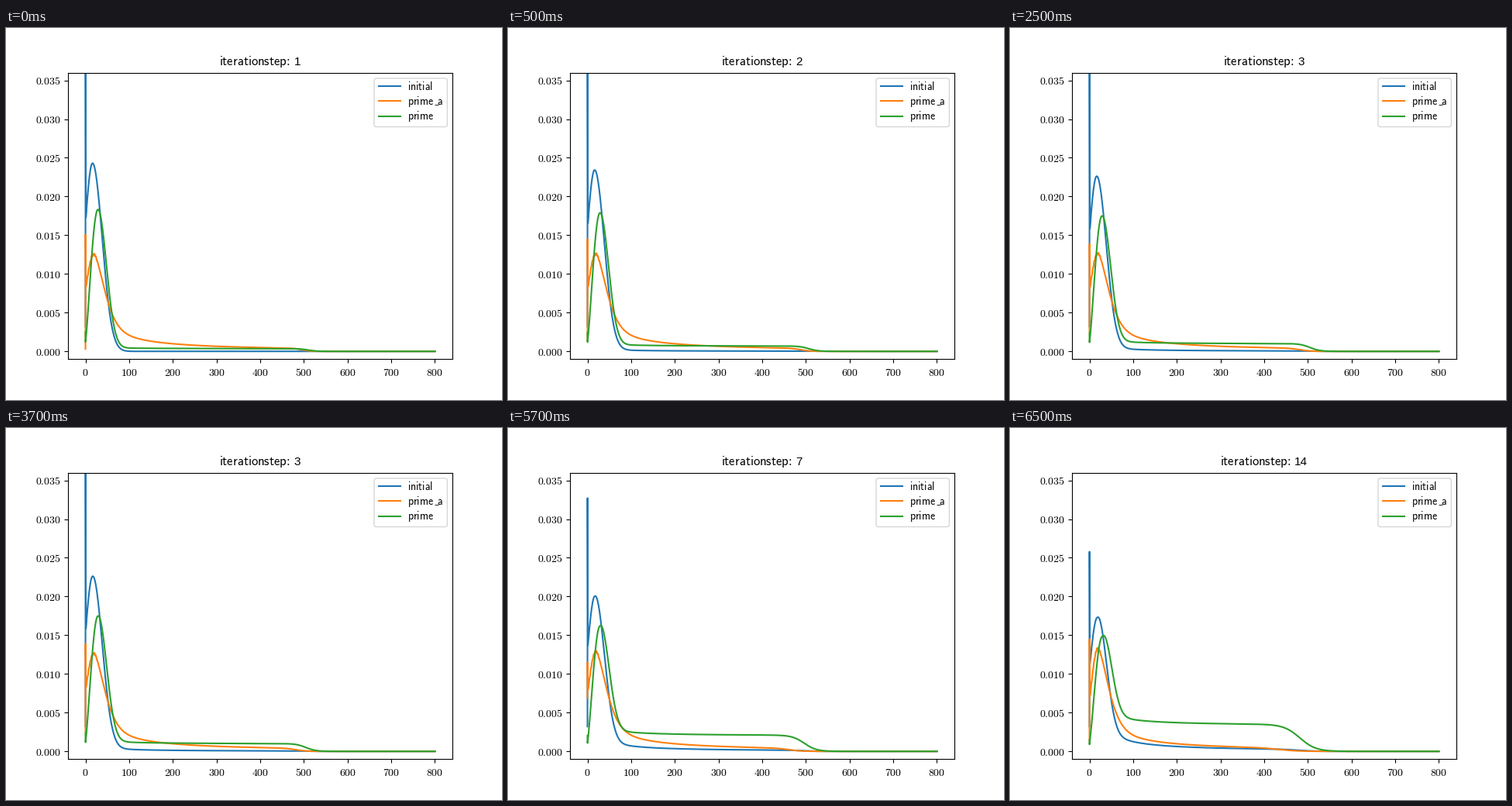
A matplotlib script for the animation above (8000 ms loop, 640 by 480 pixels).

```python
import numpy as np
import matplotlib.pyplot as plt
from matplotlib.animation import FuncAnimation
from matplotlib.patches import FancyBboxPatch

plt.rcParams["mathtext.fontset"] = "cm"

COLORS = {"initial": "#1f77b4", "prime_a": "#ff7f0e", "prime": "#2ca02c"}
STEPS = [1, 2, 3, 7, 14]
FRAMES = 16

x = np.linspace(1, 800, 1600)
x_all = np.concatenate([[0, 0.1], x])


def decay(n, rate):
    return np.exp(-n / rate)


def bell_rise(center, width):
    return np.exp(-(np.minimum(x - center, 0) / width) ** 2)


def sine_rise(center):
    return 0.07 + 0.93 * np.sin(np.pi / 2 * np.clip(x / center, 0, 1)) ** 1.27


def tail(level, pull, mid, width):
    """Plateau plus 1/x part, fading in near zero and out at mid."""
    cutoff = 1 / (1 + np.exp((x - mid) / width))
    return (level + pull / x) * (1 - np.exp(-(x / 40) ** 2)) * cutoff


def curve(spike, peak, center, rise, base, width, power=2):
    """Spike at zero, rise to the peak, then a bell-shaped fall onto base."""
    head = peak - np.interp(center, x, base)
    fall = head * np.exp(-(np.maximum(x - center, 0) / width) ** power) + base
    return np.concatenate([spike, np.where(x < center, peak * rise, fall)])


def cutoff_of(n):
    return 511 - 2.1 * n, 9.5 + 0.63 * n


def initial(n):
    center = 16 + 0.15 * n
    base = tail(0, 0.234 * (1 - decay(n - 1, 17)), *cutoff_of(n))
    spike = [0.0032, 0.018 + 0.0278 * decay(n, 11)]
    peak = 0.0142 + 0.01106 * decay(n, 11)
    return curve(spike, peak, center, bell_rise(center, 26), base,
                 31.3 - 0.2 * n)


def prime_a(n):
    base = tail(0, 0.196, 412 + 92 * decay(n, 11), 9 + 0.93 * n)
    swing = abs(n - 8)
    spike = [max(0, 0.008 - 0.0011 * swing), 0.0109 + 0.0006 * swing]
    y = curve(spike, 0.01245 + 0.00006 * n, 19,
              bell_rise(19, 28.4 - 0.42 * n), base, 29.5, 1.47)
    y[2:] += 0.00012 * np.sin(1.9 * x) * (x < 26)
    return y


def prime(n):
    center = 28.4 + 0.08 * n
    level = 0.0059 * (1 - decay(n, 17))
    base = tail(level, 24 * level, *cutoff_of(n))
    spike = [0.0026 - 0.00008 * n, 0.00125 - 0.000025 * n]
    peak = 0.0133 + 0.0055 * decay(n, 11)
    return curve(spike, peak, center, sine_rise(center), base, 26.9 + 0.1 * n)


fig = plt.figure(figsize=(6.4, 4.8), dpi=100, facecolor="white")
ax = fig.add_axes([0.125, 0.11, 0.775, 0.77])
ax.set(xlim=(-40, 840), ylim=(-0.001, 0.036),
       xticks=np.arange(0, 801, 100), yticks=np.arange(8) * 0.005)
ax.xaxis.set_major_formatter(lambda v, _: rf"$\mathrm{{{v:.0f}}}$")
ax.yaxis.set_major_formatter(lambda v, _: rf"$\mathrm{{{v:.3f}}}$")
ax.tick_params(axis="x", pad=4.2)
ax.tick_params(axis="y", pad=2.9)
lines = [ax.plot([], [], color=c, lw=1.5)[0] for c in COLORS.values()]

# overlay in pixel coordinates for title and legend
page = fig.add_axes([0, 0, 1, 1])
page.set(xlim=(0, 640), ylim=(480, 0))
page.axis("off")

# negative space cancels the relation spacing in front of the colon
title = page.text(0, 48.3, r"$\mathsf{iterationstep}\hspace{-0.2}\mathsf{:}$",
                  size=12)
number = page.text(0, 48.3, "", size=11, ha="right", family="Liberation Sans")

page.add_patch(FancyBboxPatch(
    (475, 64.9), 94.4, 62.6, boxstyle="round,pad=0,rounding_size=2.8",
    mutation_scale=1, fc="white", ec="0.8", lw=1, alpha=0.8))
for row, (name, color) in enumerate(COLORS.items()):
    y = 75 + 19.3 * row
    word, _, suffix = name.partition("_")
    label = rf"\mathsf{{{word}}}"
    if suffix:
        label += rf"\hspace{{0.52}}\mathsf{{{suffix}}}"
        page.plot([553, 557.6], [y + 4.7] * 2, color="black", lw=0.6,
                  solid_capstyle="butt")
    page.plot([480.5, 509], [y, y], color=color, lw=1.5)
    page.text(518.5, y + 4.86, f"${label}$", size=10)


def update(frame):
    n = STEPS[(frame + 3) // 4]  # first step is shown for one frame only
    for line, values in zip(lines, (initial(n), prime_a(n), prime(n))):
        line.set_data(x_all, values)
    half = 48.3 + 4.2 * len(str(n))
    title.set_x(327.5 - half)
    number.set_x(327.5 + half)
    number.set_text(str(n))
    return [*lines, title, number]


anim = FuncAnimation(fig, update, frames=FRAMES, interval=500,
                     repeat=True, repeat_delay=0)
plt.show()
```
